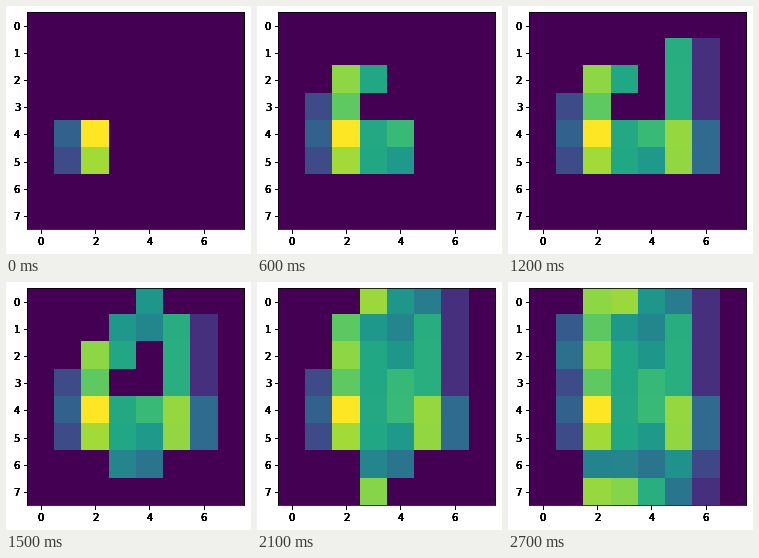
These frames come from a looping animation (245 by 248 pixels, 3000 ms). A matplotlib script:

```python
import numpy as np
import matplotlib.pyplot as plt
from matplotlib.animation import FuncAnimation

W, H = 245, 248
DPI = 100
PT = 72 / DPI  # points per pixel
SIDE, LEFT, TOP = 217.44, 21.03, 6.03
RECT = [LEFT / W, 1 - (TOP + SIDE) / H, SIDE / W, SIDE / H]
N = 8

rows, cols = np.mgrid[:N, :N]


def bump(row, col, amount, width=0.45):
    return amount * np.exp(-((rows - row) / 0.5) ** 2
                           - ((cols - col) / width) ** 2)


def heat_map():
    """Column profile with a ripple on the left ridge, plus soft bumps."""
    profile = np.array([-.04, .27, .79, .60, .53, .63, .14, -.04])
    ripple = 0.04 * np.cos(np.pi * rows) * ((cols == 1) | (cols == 2))
    centre = bump(3.5, 4, .38) + bump(4.5, 5.5, .84, .8) + bump(4.45, 2, .39)
    top = (bump(0, 1, -.32) + bump(0, 3, .25) + bump(0, 5, -.21)
           + bump(1.5, 1, .16) + bump(1, 3.5, -.12, .7))
    bottom = (bump(6, 3.5, -.15, 3) + bump(6, 2, -.26) + bump(6, 6, .15)
              + bump(7, 3, .22, 1.15) + bump(7, 5, -.25) + bump(6.5, 1, -.85))
    return np.clip(profile + ripple + centre + top + bottom, 0, 1)


# Seed points (row, col) per step; a cell appears with its nearest seed.
SEEDS = [
    [(4.5, 1.5)],
    [(2.5, 2)],
    [(4.5, 3.5)],
    [(4.4, 5.5)],
    [(2.1, 5.5)],
    [(.8, 3.7), (6, 3.5)],
    [(2.8, 3.9), (-.3, 6)],
    [(0, 3), (-.3, 5), (1, 2), (7, 3)],
    [(6, 2), (7, 4.8)],
    [(0, 2), (1.5, 1), (7, 2)],
]


def reveal_steps():
    distance = [np.min([np.hypot(rows - r, cols - c) for r, c in seeds], axis=0)
                for seeds in SEEDS]
    return np.argmin(distance, axis=0)


HEAT = heat_map()
STEP = reveal_steps()


def set_ticks(axes):
    axes.set_xticks(range(0, N, 2))
    axes.set_yticks(range(N))
    axes.tick_params(length=3.5 * PT, width=0.8 * PT, pad=3.5 * PT,
                     labelsize=10 * PT, labelfontfamily="DejaVu Sans")
    axes.tick_params(axis="x", pad=4.2 * PT)


fig = plt.figure(figsize=(W / DPI, H / DPI), dpi=DPI, facecolor="white")
ax = fig.add_axes(RECT)
image = ax.imshow(np.zeros((N, N)), cmap="viridis", vmin=0, vmax=1,
                  interpolation="nearest", aspect="auto")
set_ticks(ax)
for spine in ax.spines.values():
    spine.set_linewidth(0.8 * PT)

# Stacked copies of the labels harden their soft edges.
for _ in range(8):
    overlay = fig.add_axes(RECT, facecolor="none")
    overlay.set(xlim=ax.get_xlim(), ylim=ax.get_ylim())
    overlay.spines[:].set_visible(False)
    set_ticks(overlay)


def update(step):
    image.set_data(np.where(STEP <= step, HEAT, 0))
    return [image]


anim = FuncAnimation(fig, update, frames=len(SEEDS), interval=300,
                     repeat=True, repeat_delay=0, blit=False)
plt.show()
```
